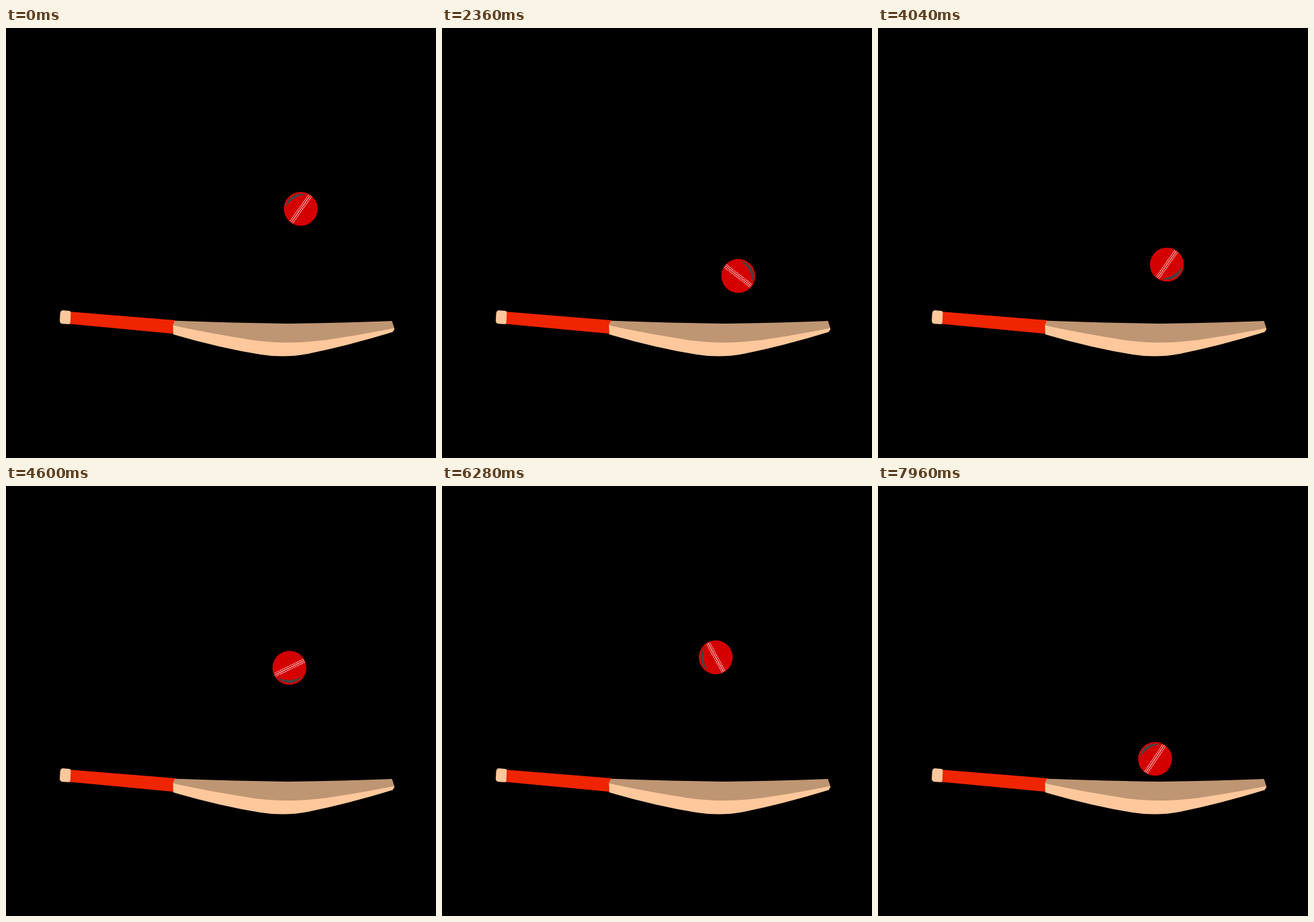
An HTML page for the animation above (8000 ms loop, 640 by 640 pixels).

```html
<!DOCTYPE html>
<html lang="en">
<head>
<meta charset="utf-8">
<title>Cricket ball and bat</title>
<style>
  html, body { margin: 0; width: 100%; height: 100%; overflow: hidden; background: #000; }
  svg { display: block; width: 100vw; height: 100vh; }
</style>
</head>
<body>
<svg viewBox="0 0 640 640">
  <g id="bat">
    <path fill="#ef2400" d="M95 422.3 L252 434.9 L249 455 L95 440.5Z"/>
    <path fill="#ffc89c" d="M85 420.3 L94 421 Q96.6 421.3 96.4 424 L95.8 438 Q95.6 441 93 440.8 L84 440.2 Q80 439.6 80 436 L80.6 425 Q81 420.2 85 420.3Z"/>
    <path fill="#ffc89c" d="M248.5 442 Q340 462 420 467 L577 445.5 L578.3 448 L575.5 452.5 Q512 472 449 485 Q415 491.5 379 486 Q317 476 249 456Z"/>
    <path fill="#bf9673" d="M251.5 435.7 Q340 439 420 440 Q500 439 574.5 436 L578 446.7 Q520 458 475 464.5 Q418 471.5 370 465 Q310 456 248 442.5Z"/>
  </g>
  <g id="ball">
    <circle r="25.2" fill="#d40000"/>
    <path fill="#444" transform="rotate(-67)" d="M13.9 -17.7 A22.5 22.5 0 0 1 13.9 17.7 A40 40 0 0 0 13.9 -17.7Z"/>
    <g stroke="#fff" fill="none">
      <path stroke-width=".9" d="M-24.5 0H24.5"/>
      <path stroke-width="1" stroke-dasharray="1.8 1" d="M-24.2 -2.5H24.2M-24.2 2.5H24.2"/>
    </g>
  </g>
</svg>
<script>
const LOOP = 8000, LEAD = 120, CYCLE = 560;
const TICKS = [0, 140, 180, 320, 440];   // uneven frame starts within a cycle

const FLOOR = 414.8, APEXES = [269.2, 192.3, 105];
const DROP = 8, FALL = 20.75, HIT = 29, HALF = 20;

const ball = document.getElementById('ball');

const clamp = u => Math.min(1, Math.max(0, u));
const ease = u => u * u * (3 - 2 * u);
const mix = (a, b, u) => a + (b - a) * u;
const linear = u => u;

function stepAt(ms) {
  const t = ms - LEAD;
  if (t < 0) return 0;
  return Math.floor(t / CYCLE) * TICKS.length + TICKS.filter(s => s <= t % CYCLE).length;
}

// Value at step k along [step, value] keys.
function follow(keys, k, curve) {
  const i = Math.max(1, keys.findIndex(([at]) => at > k));
  const [from, a] = keys[i - 1], [to, b] = keys[i];
  return mix(a, b, curve(clamp((k - from) / (to - from))));
}

// Waits at the first apex, then rises and falls in equal halves.
function height(k) {
  if (k < HIT) return mix(APEXES[0], FLOOR, ease(clamp((k - DROP) / FALL)));
  const phase = (k - HIT) / HALF;
  const apex = APEXES[1 + Math.floor(phase / 2)];
  return mix(FLOOR, apex, ease(1 - Math.abs(phase % 2 - 1)));
}

const drift = k => follow([[8, 438.7], [24, 441.2], [55, 407.4], [77, 413.5]], k, ease);
const spin = k => follow([[0, -54.5], [13, 11.5], [21, 37.8], [56, 241.4], [72, 307.9]], k, linear);

function draw(ms) {
  const k = stepAt(ms % LOOP);
  ball.setAttribute('transform', `translate(${drift(k)} ${height(k)}) rotate(${spin(k)})`);
}

let start;
function tick(now) {
  start ??= now;
  draw(Math.max(0, now - start));
  requestAnimationFrame(tick);
}
draw(0);
requestAnimationFrame(tick);
</script>
</body>
</html>
```
